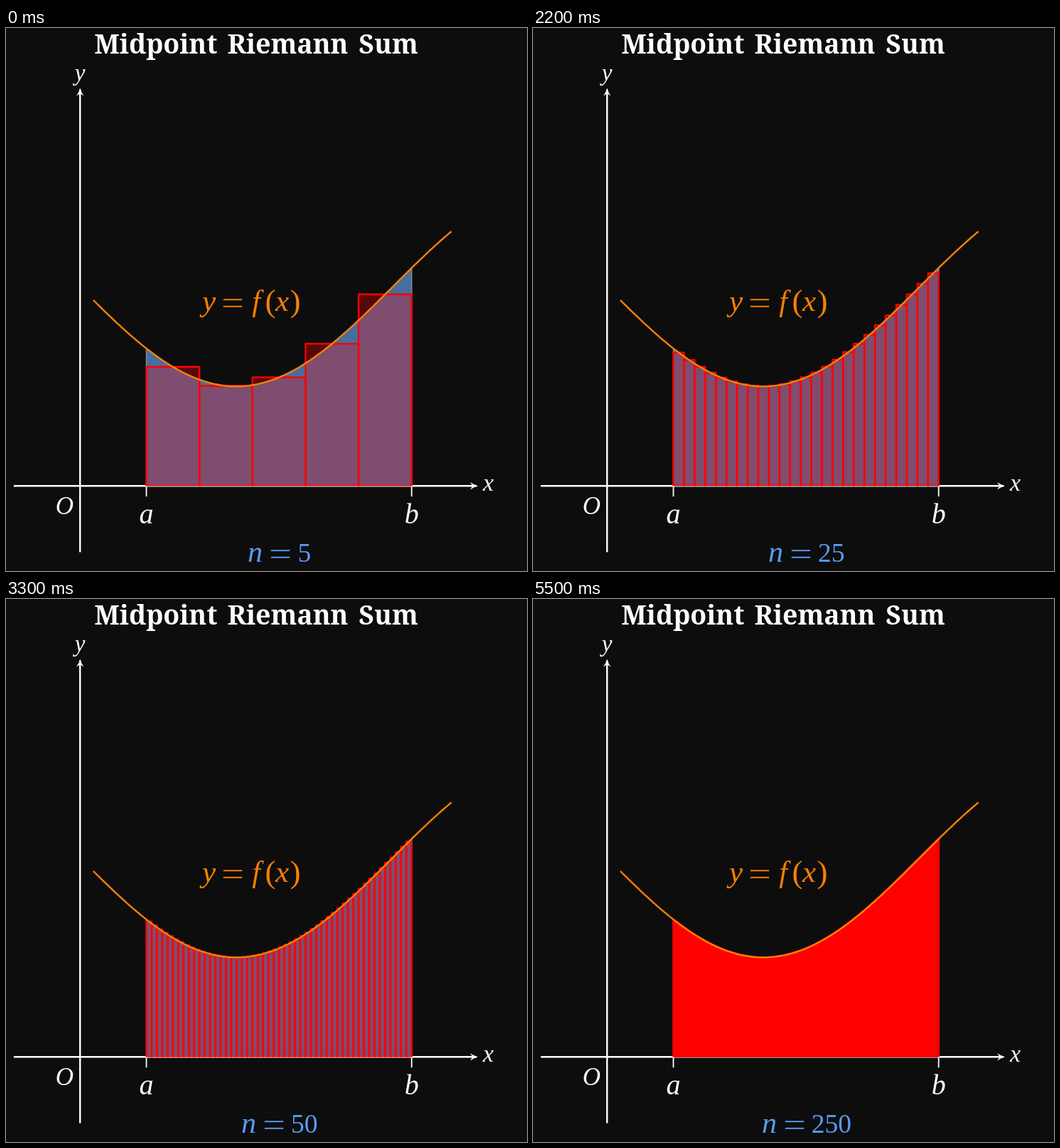
An HTML page with a canvas that plays this animation: 733 px wide and 764 px high, repeating every 6.6 s.

```html
<!DOCTYPE html>
<html lang="en">
<head>
<meta charset="utf-8">
<title>Midpoint Riemann Sum</title>
<style>
  html, body { margin: 0; width: 100%; height: 100%; overflow: hidden; background: #0d0d0d; }
  canvas { display: block; }
</style>
</head>
<body>
<canvas id="stage" width="733" height="764"></canvas>
<script>
const ctx = document.getElementById('stage').getContext('2d');
const COUNTS = [5, 10, 25, 50, 100, 250];
const STEP = 1100;
const UNIT = 93.3, OX = 104.2, OY = 644.2;
const A = 1, B = 5;
const WHITE = '#fff', ORANGE = '#ff8000', RED = '#ff0000', BLUE = '#589cf5';
const SERIF = '"Liberation Serif", "Times New Roman", serif';

const f = x => 3 - 1.5 * Math.sin(2 * x / 3);
const px = x => OX + x * UNIT;
const py = y => OY - y * UNIT;

function text(str, x, y, size, color, style = 'italic', family = SERIF) {
  ctx.font = `${style} ${size}px ${family}`;
  ctx.fillStyle = color;
  ctx.textAlign = 'center';
  ctx.fillText(str, x, y);
}

function line(x1, y1, x2, y2, color, width) {
  ctx.strokeStyle = color;
  ctx.lineWidth = width;
  ctx.beginPath();
  ctx.moveTo(x1, y1);
  ctx.lineTo(x2, y2);
  ctx.stroke();
}

// Thin equals sign centred on (x, y).
function equals(x, y, color) {
  for (const dy of [-4.8, 4.8]) line(x - 13.2, y + dy, x + 13.2, y + dy, color, 1.9);
}

function arrow(x1, y1, x2, y2) {
  line(x1, y1, x2, y2, WHITE, 2.4);
  ctx.save();
  ctx.translate(x2, y2);
  ctx.rotate(Math.atan2(y2 - y1, x2 - x1));
  ctx.fillStyle = WHITE;
  ctx.beginPath();
  ctx.moveTo(2, 0);
  ctx.quadraticCurveTo(-4, -1.5, -9, -5.2);
  ctx.lineTo(-5.5, 0);
  ctx.lineTo(-9, 5.2);
  ctx.quadraticCurveTo(-4, 1.5, 2, 0);
  ctx.fill();
  ctx.restore();
}

function traceCurve(from, to) {
  const parts = 160;
  for (let i = 0; i <= parts; i++) {
    const x = from + (to - from) * i / parts;
    ctx.lineTo(px(x), py(f(x)));
  }
}

function drawArea() {
  ctx.fillStyle = '#466e9f';
  ctx.beginPath();
  ctx.moveTo(px(A), OY);
  traceCurve(A, B);
  ctx.lineTo(px(B), OY);
  ctx.fill();
  for (const x of [A, B]) line(px(x), OY, px(x), py(f(x)), '#858d96', 1.5);
}

function drawBars(n) {
  const dx = (B - A) / n;
  ctx.fillStyle = 'rgba(255, 0, 0, 0.3)';
  ctx.strokeStyle = RED;
  ctx.lineWidth = 2.4;
  ctx.lineJoin = 'round';
  for (let i = 0; i < n; i++) {
    const x = A + i * dx;
    const h = f(x + dx / 2) * UNIT;
    ctx.beginPath();
    ctx.rect(px(x), OY - h, dx * UNIT, h);
    ctx.fill();
    ctx.stroke();
  }
}

function drawCurve() {
  ctx.strokeStyle = ORANGE;
  ctx.lineWidth = 2.4;
  ctx.beginPath();
  traceCurve(0.2, 5.6);
  ctx.stroke();
}

function drawLabels(n) {
  const title = (word, x) => text(word, x, 36, 37.4, WHITE, 'bold', '"Noto Serif", serif');
  title('Midpoint', 210.8);
  title('Riemann', 396.5);
  title('Sum', 538);

  text('y', 104, 74, 33, WHITE);
  text('x', 678.5, 651, 34, WHITE);
  text('O', 82.5, 684, 35, WHITE);
  text('a', px(A), 697, 40, WHITE);
  text('b', px(B), 697, 40, WHITE);

  text('y', 285.5, 398, 43, ORANGE);
  equals(319, 387, ORANGE);
  text('f', 352, 398, 42, ORANGE);
  text('(', 372, 399, 45, ORANGE, 'normal');
  text('x', 388.5, 398, 43, ORANGE);
  text(')', 407, 399, 45, ORANGE, 'normal');

  const digits = String(n);
  const shift = 9 * digits.length;
  text('n', 359.5 - shift, 751, 42, BLUE);
  equals(395 - shift, 740, BLUE);
  text(digits, 419.8, 751, 37.5, BLUE, 'normal');
}

function draw(n) {
  ctx.fillStyle = '#0d0d0d';
  ctx.fillRect(0, 0, 733, 764);

  arrow(px(-1), OY, 662, OY);
  arrow(OX, py(-1), OX, 86.5);
  for (const x of [A, B]) line(px(x), OY, px(x), OY + 15, WHITE, 1.8);

  // Shading stops on the axis, leaving its lower edge visible.
  ctx.save();
  ctx.beginPath();
  ctx.rect(0, 0, 733, OY + 0.4);
  ctx.clip();
  drawArea();
  drawBars(n);
  ctx.restore();

  drawCurve();
  drawLabels(n);
}

const start = performance.now();
function tick() {
  const t = Math.max(0, performance.now() - start);
  draw(COUNTS[Math.floor(t / STEP) % COUNTS.length]);
  requestAnimationFrame(tick);
}
tick();
</script>
</body>
</html>
```
